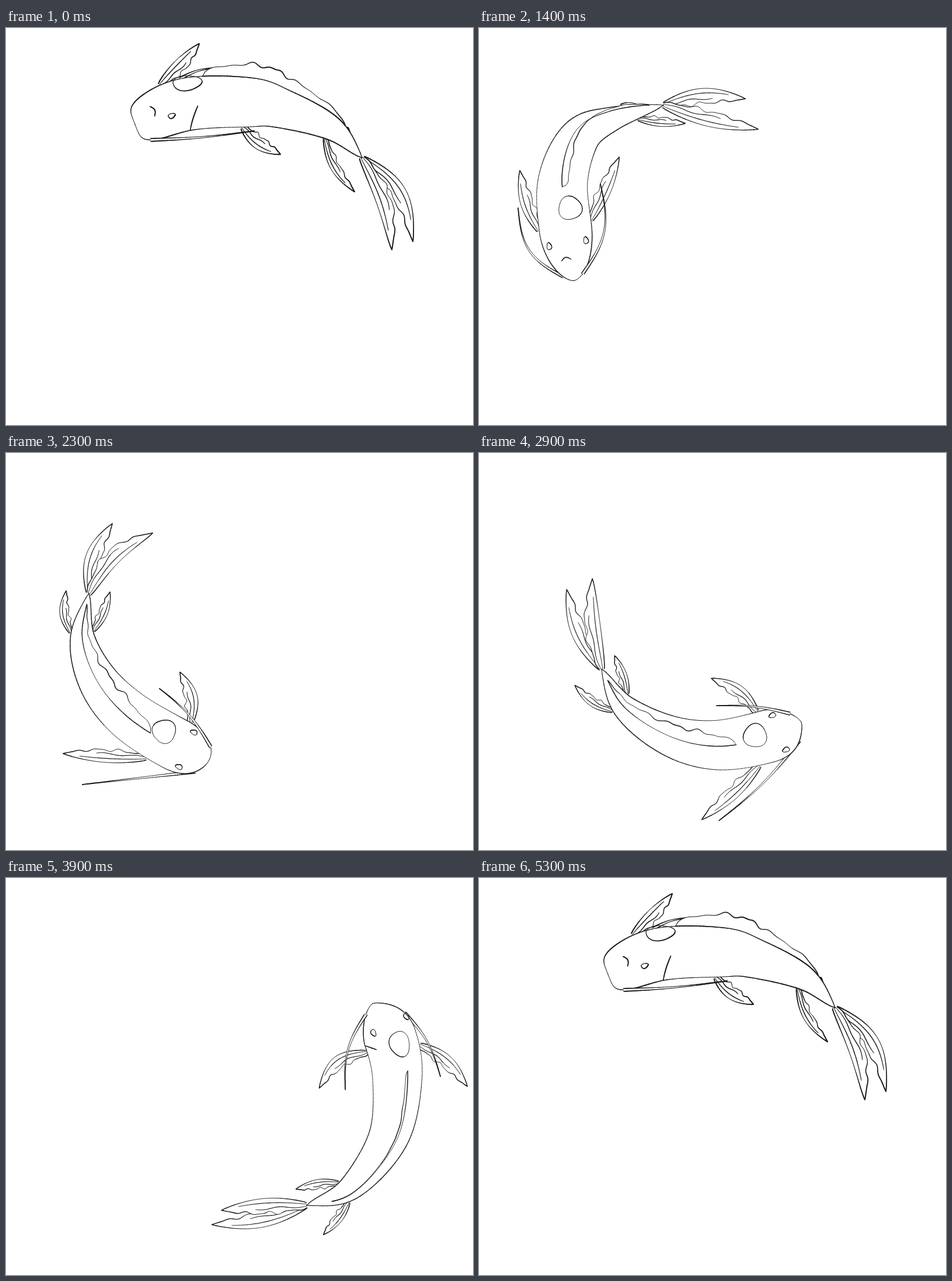
An HTML page with a canvas that plays this animation: 800x679 px, repeating every 5.4 s.

```html
<!DOCTYPE html>
<html lang="en">
<head>
<meta charset="utf-8">
<title>Swimming koi</title>
<style>
html, body { margin: 0; width: 100%; height: 100%; overflow: hidden; background: #fff; }
canvas { display: block; }
</style>
</head>
<body>
<canvas id="stage" width="800" height="679"></canvas>
<script>
// A pose is a spine from nose to tail, limbs as [place on spine, tip x, tip y, bend]
// and the back fin as [start, end, side at start, side at end, height at start, height at end].
// "Out" is the outer side of the circle the fish swims, "In" the inner side.
const poses = [
  {
    step: 0, roll: 0.8, blunt: 0.2, mouth: 9, weight: 1.6, spot: [310, 94],
    spine: [[221, 165], [307, 131], [415, 127], [471, 137], [557, 171], [610, 222]],
    dorsal: [0.26, 0.84, 1, 1, 27, 20],
    tailOut: [1, 697, 365, -22], tailIn: [1, 661, 379, -13],
    pelvicOut: [0.85, 585, 195, 0], pelvicIn: [0.8, 597, 280, 8],
    finOut: [0.14, 331, 27, 2], finIn: [0.38, 470, 216, 5],
    barbelOut: [0.2, 365, 68, -5], barbelIn: [0.03, 425, 176, 3]
  },
  {
    step: 6, roll: 0.35, blunt: 0.9, mouth: 8, weight: 1.35, spot: [180, 155],
    spine: [[150, 282], [171, 212], [198, 158], [287, 116], [398, 115], [449, 143]],
    dorsal: [0.38, 0.88, 0.6, 1, 17, 17],
    tailOut: [1, 618, 162, -10], tailIn: [1, 604, 198, 2],
    pelvicOut: [0.85, 420, 115, 0], pelvicIn: [0.84, 459, 190, 8],
    finOut: [0.3, 64, 106, -15], finIn: [0.26, 341, 209, 0],
    barbelOut: [0.2, 108, 111, -24], barbelIn: [0.18, 309, 131, 10]
  },
  {
    step: 14, roll: 0, blunt: 0.6, mouth: 8, weight: 1.25, spot: [156, 308],
    spine: [[163, 432], [148, 342], [144, 260], [173, 187], [227, 156], [316, 132]],
    dorsal: [0.37, 0.95, 0, 0.9, -22, 16],
    tailOut: [1, 456, 121, -10], tailIn: [1, 478, 173, 3],
    pelvicOut: [0.85, 280, 138, 0], pelvicIn: [0.9, 353, 163, 1],
    finOut: [0.2, 70, 244, -5], finIn: [0.22, 240, 221, 0],
    barbelOut: [0.02, 67, 308, -24], barbelIn: [0.02, 208, 267, 22]
  },
  {
    step: 21, roll: 0, blunt: 0.5, mouth: 0, weight: 1.25, spot: [271, 476],
    spine: [[349, 523], [290, 498], [210, 448], [157, 388], [131, 315], [142, 240]],
    dorsal: [0.3, 0.95, 0.1, 0, -28, -18],
    tailOut: [1, 182, 121, -12], tailIn: [1, 251, 137, -17],
    pelvicOut: [0.82, 103, 236, -7], pelvicIn: [0.83, 178, 238, 3],
    finOut: [0.27, 98, 514, 0], finIn: [0.18, 298, 375, 9],
    barbelOut: [0.05, 131, 567, 0], barbelIn: [0.02, 263, 403, 8]
  },
  {
    step: 30, roll: 0, blunt: 0.9, mouth: 0, weight: 1.2, spot: [669, 397],
    spine: [[686, 326], [675, 385], [636, 458], [565, 508], [463, 538], [387, 525]],
    dorsal: [0.36, 0.93, 0, 0, -27, -12],
    tailOut: [1, 215, 483, -7], tailIn: [1, 228, 467, 3],
    pelvicOut: [0.82, 375, 596, -4], pelvicIn: [0.85, 383, 499, 0],
    finOut: [0.25, 736, 545, -6], finIn: [0.27, 519, 419, 8],
    barbelOut: [0.06, 716, 539, -17], barbelIn: [0.06, 577, 427, 2]
  },
  {
    step: 39, roll: 0.75, blunt: 0.5, mouth: 0, weight: 1.2, spot: [585, 150],
    spine: [[486, 150], [555, 169], [605, 200], [692, 285], [709, 395], [668, 470]],
    dorsal: [0.38, 0.84, 0.95, 1, 18, 19],
    tailOut: [1, 547, 577, -10], tailIn: [1, 551, 531, 2],
    pelvicOut: [0.85, 708, 475, 0], pelvicIn: [0.8, 628, 455, 6],
    finOut: [0.3, 689, 136, -11], finIn: [0.2, 488, 302, 24],
    barbelOut: [0.2, 600, 160, 0], barbelIn: [0, 543, 304, 28]
  }
];

const halfWidth = { tail: 13, pelvic: 8, fin: 11, barbel: 2.5 };
const limbs = Object.keys(halfWidth).flatMap(kind => [kind + 'Out', kind + 'In']);
const LOOP = 5400, TICK = 100, STEPS = 45, GIRTH = 45;
const heldTicks = [16, 22, 25, 27, 35, 40, 43, 49];
const ctx = document.getElementById('stage').getContext('2d');

const mix = (a, b, t) => a + (b - a) * t;
const mixAll = (a, b, t) => a.map((v, i) => mix(v, b[i], t));
const range = (n, f) => Array.from({ length: n + 1 }, (_, i) => f(i / n));
const rotate = ([x, y], a) => [x * Math.cos(a) - y * Math.sin(a), x * Math.sin(a) + y * Math.cos(a)];
const spline = (a, b, c, d, t) =>
  b + t / 2 * (c - a + t * (2 * a - 5 * b + 4 * c - d + t * (3 * (b - c) + d - a)));

function hermite(p, q, vp, vq, t) {
  const t2 = t * t, t3 = t2 * t;
  return (2 * t3 - 3 * t2 + 1) * p + (3 * t2 - 2 * t3) * q + (t3 - 2 * t2 + t) * vp + (t3 - t2) * vq;
}

// Key points of every pose, relative to its centre.
for (const pose of poses) {
  const points = [...pose.spine, pose.spot, ...limbs.map(name => pose[name].slice(1, 3))];
  pose.center = [0, 1].map(k => points.reduce((sum, p) => sum + p[k], 0) / points.length);
  pose.points = points.map(p => p.map((v, k) => v - pose.center[k]));
}

// Best-fit turn to the next pose and velocity of the centre.
poses.forEach((pose, i) => {
  const next = pose.next = poses[(i + 1) % poses.length];
  const prev = poses[(i + poses.length - 1) % poses.length];
  let cross = 0, dot = 0;
  pose.points.forEach(([x, y], j) => {
    const [nx, ny] = next.points[j];
    cross += x * ny - y * nx;
    dot += x * nx + y * ny;
  });
  pose.turn = Math.atan2(cross, dot);
  pose.span = (next.step - pose.step + STEPS) % STEPS;
  const gap = (next.step - prev.step + STEPS) % STEPS;
  pose.velocity = [0, 1].map(k => (next.center[k] - prev.center[k]) / gap);
});

function poseAt(step) {
  const a = poses.filter(p => p.step <= step).pop(), b = a.next;
  const t = (step - a.step) / a.span;
  const center = [0, 1].map(k =>
    hermite(a.center[k], b.center[k], a.velocity[k] * a.span, b.velocity[k] * a.span, t));
  const points = a.points.map((p, i) =>
    mixAll(rotate(p, a.turn * t), rotate(b.points[i], a.turn * (t - 1)), t).map((v, k) => v + center[k]));
  const pose = { spine: points.slice(0, 6), spot: points[6], dorsal: mixAll(a.dorsal, b.dorsal, t) };
  for (const key of ['roll', 'blunt', 'mouth', 'weight']) pose[key] = mix(a[key], b[key], t);
  limbs.forEach((name, i) => {
    const [place, , , bend] = mixAll(a[name], b[name], t);
    pose[name] = { place, bend, tip: points[7 + i] };
  });
  return pose;
}

function drawFish(pose) {
  const { spine, roll } = pose;
  const last = spine.length - 1;
  const beyond = (end, near) => end.map((v, k) => 2 * v - near[k]);
  const chain = [beyond(spine[0], spine[1]), ...spine, beyond(spine[last], spine[last - 1])];

  function spineAt(u) {
    const i = Math.max(0, Math.min(last - 1, Math.floor(u * last)));
    return [0, 1].map(k => spline(...chain.slice(i, i + 4).map(p => p[k]), u * last - i));
  }
  function outward(u) {
    const [x0, y0] = spineAt(u - 0.01), [x1, y1] = spineAt(u + 0.01);
    const length = Math.hypot(x1 - x0, y1 - y0);
    return [(y1 - y0) / length, (x0 - x1) / length];
  }
  function girth(u) {
    if (u < 0.2) return GIRTH * (1 - (1 - u / 0.2) ** 2) ** pose.blunt;
    return GIRTH * Math.max(0, Math.cos((u - 0.2) / 0.8 * Math.PI / 2)) ** 0.8;
  }
  // side runs from 1 (outer edge) to -1 (inner edge)
  function onBody(u, side, lift = 0) {
    const normal = outward(u), reach = side * girth(u) + lift;
    return spineAt(u).map((v, k) => v + normal[k] * reach);
  }

  function line(pts, pen = 1, filled = false) {
    if (filled) {
      ctx.beginPath();
      pts.forEach(p => ctx.lineTo(...p));
      ctx.fill();
    }
    for (let i = 1; i < pts.length; i++) {
      ctx.lineWidth = pose.weight * pen * (0.9 + 0.3 * Math.sin(i * 0.12 + pts.length));
      ctx.beginPath();
      ctx.moveTo(...pts[i - 1]);
      ctx.lineTo(...pts[i]);
      ctx.stroke();
    }
  }

  function limb(name) {
    const { place, tip, bend } = pose[name];
    const [, kind, end] = name.match(/(\w+?)(Out|In)/);
    const side = end === 'Out' ? 1 : -1;
    const base = onBody(place, side);
    const dx = tip[0] - base[0], dy = tip[1] - base[1], length = Math.hypot(dx, dy);
    const half = Math.min(halfWidth[kind], length * 0.2);
    const leaf = t => kind === 'barbel' ? 1 - t : 0.35 * (1 - t) + 0.85 * Math.max(0, Math.sin(Math.PI * t)) ** 0.8;
    const at = (t, across) => {
      const off = bend * Math.sin(Math.PI * t) + across * half * leaf(t);
      return [base[0] + dx * t - dy / length * off, base[1] + dy * t + dx / length * off];
    };
    const ruffle = t => kind === 'barbel' ? 1 : 0.9 + 0.18 * Math.sin(t * 24) + 0.08 * Math.sin(t * 41);
    line([...range(50, t => at(t, -side)), ...range(50, t => at(1 - t, side * ruffle(1 - t)))], 1, true);
    if (kind === 'barbel') return;
    line(range(30, t => at(t * 0.8, -side * 0.4)), 0.75);
    line(range(30, t => at(t * 0.6, side * (0.3 + 0.15 * Math.sin(t * 9)))), 0.75);
  }

  function backFin() {
    const [start, end, sideStart, sideEnd, liftStart, liftEnd] = pose.dorsal;
    const at = (t, lift) => onBody(mix(start, end, t), mix(sideStart, sideEnd, t), lift);
    const edge = t => at(t, mix(liftStart, liftEnd, t) * Math.max(0, Math.sin(Math.PI * t ** 0.7)) ** 0.7
      * (0.95 + 0.1 * Math.sin(t * 31) + 0.07 * Math.sin(t * 53)));
    line([...range(80, edge), ...range(60, t => at(1 - t, 0))], 1, true);
  }

  function oval([cx, cy], u, along, across, wobble) {
    const [nx, ny] = outward(u);
    line(range(40, t => {
      const a = t * 2 * Math.PI, r = 1 + wobble * Math.sin(3 * a + 1);
      const x = along * r * Math.cos(a), y = across * r * Math.sin(a);
      return [cx + nx * y - ny * x, cy + ny * y + nx * x];
    }));
  }

  limbs.filter(name => name !== 'barbelIn').forEach(limb);
  line([...range(90, t => onBody((1 - t) ** 2, 1)), ...range(90, t => onBody(t * t, -1))], 1, true);
  backFin();
  oval(pose.spot, 0.25, 20 + 6 * roll, 20 - 9 * roll, 0.06);
  for (const side of [0.75, -0.75]) {
    const turned = side + roll * 0.6;
    if (turned < 1) oval(onBody(0.14, turned), 0.14, 6, 4, 0.1);
  }
  if (pose.mouth > 1) line(range(12, t => onBody(0.08 + 0.01 * Math.sin(Math.PI * t), 0.2, (t * 2 - 1) * pose.mouth)));
  if (roll > 0.1) line(range(24, t => onBody(0.2 + 0.04 * t, -1 + t * roll * 1.1)));
  limb('barbelIn');
}

function draw(step) {
  ctx.fillStyle = '#fff';
  ctx.strokeStyle = '#1a1a1a';
  ctx.lineCap = 'round';
  ctx.fillRect(0, 0, 800, 679);
  drawFish(poseAt(step));
}

let start = null, shown = -1;
function play(now) {
  start ??= now;
  const tick = Math.floor((now - start) % LOOP / TICK);
  const step = (tick - heldTicks.filter(held => held <= tick).length) % STEPS;
  if (step !== shown) draw(shown = step);
  requestAnimationFrame(play);
}
requestAnimationFrame(play);
</script>
</body>
</html>
```
